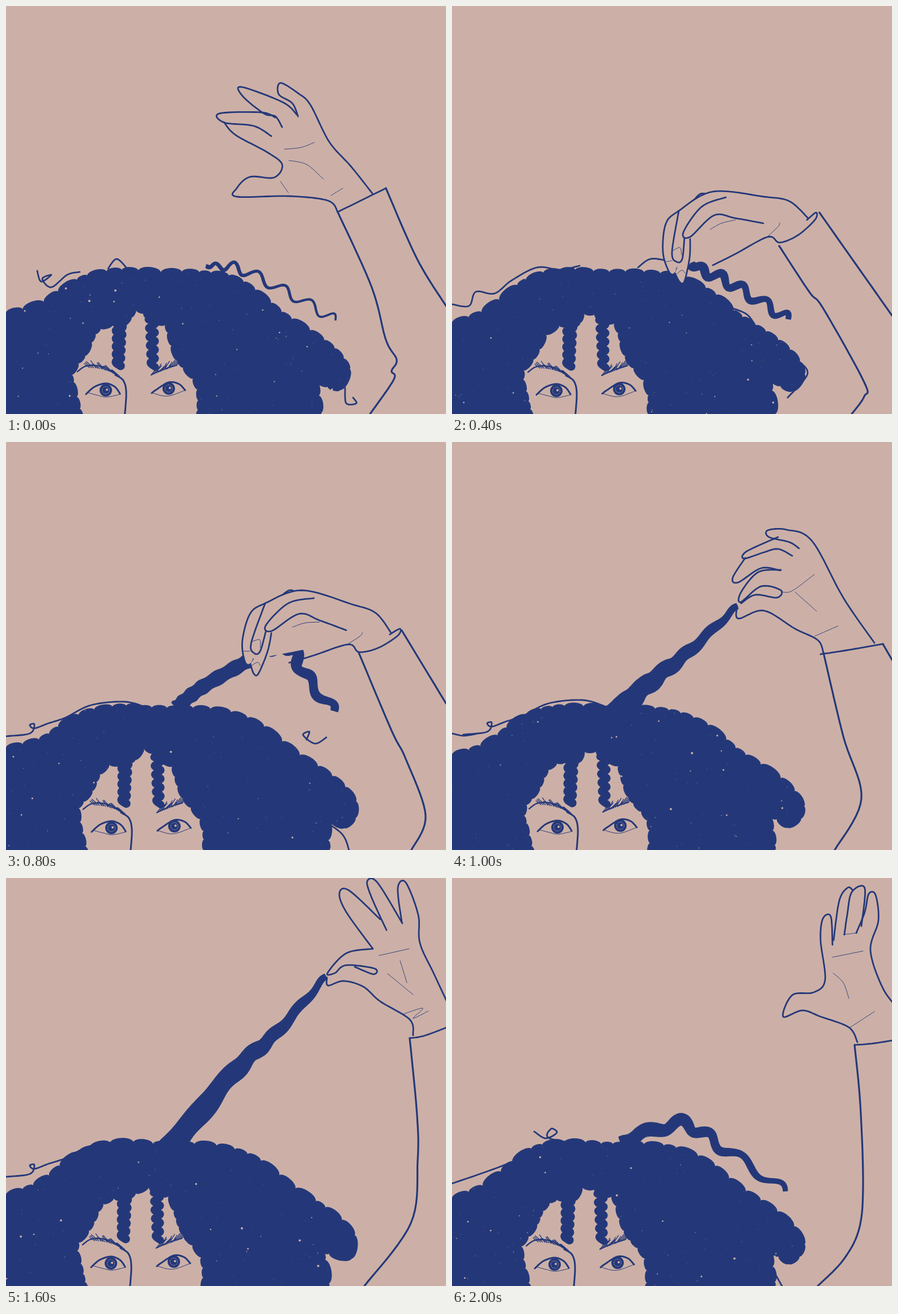
An HTML page that plays this animation: 776 px wide and 721 px high, repeating every 2.2 s.

```html
<!DOCTYPE html>
<html lang="en">
<head>
<meta charset="utf-8">
<title>Curl</title>
<style>
html, body { margin: 0; width: 100%; height: 100%; overflow: hidden; background: #ccb0a7; }
svg { display: block; width: 100vw; height: 100vh; fill: none; stroke: #243879; stroke-linecap: round; stroke-linejoin: round; }
.pose { visibility: hidden; }
.ink { fill: #243879; stroke: none; }
.skin { fill: #ccb0a7; stroke: none; }
.solid { fill: #ccb0a7; }
</style>
</head>
<body>
<svg id="stage" viewBox="0 0 776 721"></svg>
<script>
const STEP = 200;

const points = text => (text.match(/\S+ \S+/g)).map(pair => pair.split(' ').map(Number));
const toPath = pts => 'M' + pts.map(p => p.map(v => v.toFixed(1)).join(' ')).join('L');

function seeded(seed) {
  let s = seed * 7919 + 17;
  const next = () => (s = s * 16807 % 2147483647) / 2147483647;
  next();
  return next;
}

// Catmull-Rom samples through the points
function smooth(pts, steps = 10) {
  const out = [];
  for (let i = 0; i < pts.length - 1; i++) {
    const b = pts[i], c = pts[i + 1], a = pts[i - 1] || b, d = pts[i + 2] || c;
    for (let s = 0; s < steps; s++) {
      const t = s / steps;
      out.push([0, 1].map(k => b[k] + t / 2 * (c[k] - a[k] + t * (2 * a[k] - 5 * b[k] + 4 * c[k] - d[k]
        + t * (3 * b[k] - a[k] - 3 * c[k] + d[k])))));
    }
  }
  return [...out, pts[pts.length - 1]];
}

const line = (text, w, cls = '') => `<path class="${cls}" d="${toPath(smooth(points(text)))}" stroke-width="${w}"/>`;
const lines = (list = [], w, cls) => list.map(s => line(s, w, cls)).join('');

// Scalloped edge: rounded bumps of varying length along a smooth curve
function bumps(pts, size, height, rnd) {
  const curve = smooth(pts, 30);
  let [x, y] = curve[0], goal = size, d = `M${x} ${y}`;
  curve.forEach(([u, v], i) => {
    const dx = u - x, dy = v - y, len = Math.hypot(dx, dy);
    if (len < goal && i < curve.length - 1) return;
    const nx = dy * height, ny = -dx * height;
    d += `C${x + dx * .1 + nx} ${y + dy * .1 + ny} ${u - dx * .1 + nx} ${v - dy * .1 + ny} ${u} ${v}`;
    [x, y] = [u, v];
    goal = size * (.6 + .8 * rnd());
  });
  return d;
}

// Tapered ribbon that waves around a guide curve
function lock({ guide, from, to, amp = 0, waves = 0 }) {
  const withNormals = pts => pts.map(([x, y], i) => {
    const a = pts[Math.max(i - 1, 0)], b = pts[Math.min(i + 1, pts.length - 1)];
    const angle = Math.atan2(b[1] - a[1], b[0] - a[0]);
    return [x, y, -Math.sin(angle), Math.cos(angle), i / (pts.length - 1)];
  });
  const wavy = withNormals(smooth(points(guide), 40)).map(([x, y, nx, ny, t]) => {
    const o = amp * Math.min(1, t * 4) * Math.sin(t * waves * 2 * Math.PI);
    return [x + nx * o, y + ny * o];
  });
  const edge = side => withNormals(wavy).map(([x, y, nx, ny, t]) => {
    const w = side * (from + (to - from) * t) / 2 * (1 + .08 * Math.sin(t * 40));
    return [x + nx * w, y + ny * w];
  });
  return `<path d="${toPath([...edge(1), ...edge(-1).reverse()])}Z" fill="#243879" stroke-width="1.5"/>`;
}

function ringlet(x, top, drift, bottom, width) {
  const n = 11, pts = Array.from({ length: n + 1 }, (_, i) =>
    [x + drift * i / n + (i % 2 ? 6 : -6) * (1 - i / n * .3), top + (bottom - top) * i / n]);
  return `<path d="${toPath(smooth(pts))}" stroke-width="${width}"/>`;
}

function specks(rnd) {
  return Array.from({ length: 130 }, () =>
    `<circle class="skin" cx="${rnd() * 600}" cy="${470 + rnd() * 251}" r="${.4 + 1.6 * rnd() ** 6}"/>`).join('');
}

function eye(x, y, open, upper, lower) {
  return `<g transform="translate(${x} ${y}) scale(1 ${open})"><circle class="ink" r="11"/>
    <circle r="6.5" stroke="#ccb0a7" stroke-width=".7" stroke-dasharray="2 2"/>
    <circle class="skin" cx="2" cy="-1" r="2"/>${line(upper, 3)}${line(lower, 1)}</g>`;
}

function brows() {
  let hairs = '';
  for (let i = 0; i < 15; i++) {
    hairs += `M${156 + i * 3.8} ${641 + 15 * (i / 14) ** 2}l${-9 - i % 3 * 2} ${-7 - i % 4 * 2}`;
    hairs += `M${265 + i * 3.2} ${654 - i * 1.2}l${8 + i % 3 * 2} ${-10 - i % 4 * 2}`;
  }
  return `<path d="${hairs}" stroke-width="1.3"/>` + line('135 648 151 638 177 639 203 653', 2.4) + line('265 654 286 644 310 637', 2);
}

const faceEdge = points('144 735 130 675 126 648 150 618 168 580 190 566 222 568 236 540 252 546 268 562 288 562 300 600 312 630 345 672 347 735');
const hairEdge = points('0 548 60 530 105 497 150 474 210 466 265 470 330 470 395 477 455 503 505 545 560 580 600 612 622 650 598 682 575 668 543 645 562 672 570 721');

const face = (p, rnd) => `<g transform="translate(${p.face})">
  <path class="skin" d="${bumps(faceEdge, 20, -.22, rnd)}Z"/>
  ${eye(185, 681, p.open || 1, '-35 7 -20 -6 0 -12 16 -6 25 6', '-33 4 -14 9 2 12 26 7')}
  ${eye(296, 678, p.open || 1, '-30 8 -22 2 0 -11 18 -8 29 3', '-28 8 -10 13 5 12 29 3')}
  ${brows()}${line('202 654 216 664 221 686 218 730', 3)}
  ${ringlet(209, 562, -2, 638, 15)}${ringlet(266, 556, 2, 640, 13)}</g>`;

function hair(p, rnd) {
  const edge = hairEdge.map(([x, y]) => [x + (x > 450 ? p.lean || 0 : 0), y + p.drop * Math.max(0, 1 - x / 150)]);
  return `<path class="ink" d="${bumps(edge, 30, .25, rnd)}L0 721Z"/>`;
}

const waveHand = {
  outline: ['646 331 608 283 570 240 537 175 515 154 484 136 481 156 505 172 515 195',
    '513 192 488 170 415 143 418 160 455 190 475 195 487 214',
    '475 197 450 188 376 190 385 206 437 212 468 230',
    '384 205 405 228 460 258 487 280 473 303 430 302 407 322 407 337 500 336 568 344 585 364',
    '670 322 585 364'],
  creases: ['491 253 520 250 544 241', '499 273 530 280 560 306', '573 335 594 322', '484 310 498 330']
};

const gripHand = {
  cls: 'solid',
  outline: ['425 345 438 332 452 333', '460 458 500 438 557 408 578 418 610 405 640 378 642 365 626 378',
    '448 392 455 400 450 425 422 443',
    '628 375 595 345 550 337 460 328 400 362 377 385 372 435 383 470 393 473 397 463',
    '420 412 419 445 410 486 402 488 393 472', '400 362 388 435 396 452 406 447 410 408',
    '483 338 440 355 408 400 420 408 462 370 500 375 549 384'],
  creases: ['455 395 475 384 500 378', '557 407 575 390 578 383', '390 432 402 427 405 440', '377 452 388 450', '395 475 405 467 411 472']
};

const liftHand = {
  outline: ['800 270 745 190 690 90 645 70 612 71 614 83 650 92 667 103',
    '630 83 575 108 570 121 605 110 630 104 655 116', '572 120 550 155 560 163 600 138 634 142',
    '635 141 595 145 565 180 564 198 600 170 635 177 628 190 590 185 565 200',
    '558 205 560 227 605 213 660 245 700 265 710 287', '705 290 745 284 815 272'],
  creases: ['637 180 655 178 694 149', '660 180 698 214', '695 258 736 240']
};

const stretchHand = {
  outline: ['790 245 755 170 730 115 727 65 705 8 691 18 698 78', '699 80 655 8 637 6 645 35 671 92',
    '660 73 605 22 588 27 600 60 647 125',
    '647 125 600 133 567 168 580 168 600 154 650 160 648 170 615 157',
    '566 176 568 190 595 182 630 192 660 218 712 250 718 278', '712 283 740 278 800 255'],
  creases: ['658 137 711 125', '673 169 718 206', '695 146 707 185', '702 240 735 230 718 248 745 235']
};

const openHand = {
  outline: ['790 235 760 195 738 128 752 75 747 30 735 28 728 60 713 97', '692 100 697 65 705 25 728 18 722 85',
    '673 110 683 40 698 17 707 22',
    '671 118 668 68 654 72 650 110 658 180 638 202 600 207 584 245 618 234 650 245 700 264 715 290',
    '710 295 745 292 800 283'],
  creases: ['671 140 725 129', '672 168 690 185 700 213', '702 264 745 236', '690 100 715 97']
};

const stage = document.getElementById('stage');
const groups = [];

function addPose(p) {
  const rnd = seeded(groups.length + 1);
  const g = document.createElementNS(stage.namespaceURI, 'g');
  g.setAttribute('class', 'pose');
  g.innerHTML = hair(p, rnd) + specks(rnd) + face(p, rnd)
    + `<g transform="translate(${p.curlShift || '0 0'})">${lines(p.curls, 2.8)}</g>`
    + p.locks.map(lock).join('') + lines(p.sleeve, 3.2)
    + `<g transform="${p.move || 'translate(0 0)'}">${lines(p.hand.outline, 2.8, p.hand.cls)}${lines(p.hand.creases, .9)}</g>`;
  stage.append(g);
  groups.push(g);
}

const wavyEnd = '0 527 30 530 42 505 75 508 105 485 150 462 190 466 225 459';
const loopedEnd = '0 520 42 515 50 499 42 500 50 506 75 497 105 487 150 465 210 459 250 470';

const reach = {
  hand: waveHand, face: '-9 -2', drop: -6, lean: -14,
  curls: ['55 468 62 487 80 475 64 482 80 497 108 475 130 470', '180 464 195 447 213 463', '532 608 555 605 573 632', '598 675 600 702 618 702 612 692'],
  locks: [{ guide: '353 460 410 464 500 508 581 555', from: 6, to: 2, amp: 9, waves: 6 }],
  sleeve: ['585 364 645 497 670 590 689 625 680 645 684 660 642 721', '670 322 725 447 776 530']
};
addPose(reach);
addPose({
  ...reach, face: '-5 -1', move: 'translate(0 15) rotate(-25 600 345)',
  sleeve: ['594 383 662 555 707 645 675 721', '653 309 776 535']
});

const pinch = {
  hand: gripHand, face: '-1 -1', drop: 12,
  curls: [wavyEnd, '328 462 350 447 380 450', '480 530 520 545 540 575', '608 625 627 650 592 692'],
  locks: [{ guide: '420 456 500 495 593 553', from: 15, to: 8, amp: 9, waves: 5 }],
  sleeve: ['577 424 630 505 655 535 727 665 727 690 705 721', '648 365 776 547']
};
addPose(pinch);
addPose({
  hand: gripHand, face: '0 0', drop: -3, open: .82, move: 'translate(14 -9)',
  curls: [wavyEnd, '528 560 555 560 580 600'],
  locks: [{ guide: '285 474 330 444 390 434', from: 24, to: 28 }, { guide: '385 434 450 424 500 476 587 549', from: 26, to: 8, amp: 8, waves: 5 }],
  sleeve: ['591 409 620 475 655 520 741 665 692 721', '655 358 776 525']
});
addPose({
  hand: gripHand, face: '1 1', drop: -8, move: 'translate(62 -66) rotate(10 460 328)',
  curls: [loopedEnd, '565 522 545 533 524 518 535 512 530 526', '535 655 590 690 605 721'],
  locks: [{ guide: '300 470 345 434 428 386', from: 24, to: 24 }, { guide: '465 366 500 362 530 415 579 475', from: 24, to: 12, amp: 7, waves: 4 }],
  sleeve: ['622 372 680 510 705 560 740 660 715 721', '698 333 776 462']
});

const strand = guide => [{ guide, from: 44, to: 9, amp: 2, waves: 6 }];
const lift = {
  hand: liftHand, face: '2 0', drop: 5, curlShift: '20 -3',
  curls: [loopedEnd, '-20 518 0 522 22 519'],
  locks: strand('275 492 375 372 460 305 558 205'),
  sleeve: ['710 287 703 295 716 400 715 550 685 660 628 721']
};
addPose({
  ...lift, face: '1 0', move: 'translate(-55 85)',
  locks: strand('275 492 345 428 420 368 503 290'),
  sleeve: ['655 372 690 520 722 630 675 721', '760 357 776 385']
});
addPose({ ...lift, curls: [...lift.curls, '325 413 348 420 358 398 395 361'] });

const stretch = {
  hand: stretchHand, face: '0 0', drop: 12, curlShift: '0 8',
  curls: [loopedEnd, '335 410 365 404 378 377 400 354'],
  locks: strand('280 490 400 345 480 270 564 174'),
  sleeve: ['712 283 725 420 726 500 714 610 632 721']
};
addPose({
  ...stretch, move: 'translate(-3 17)',
  locks: strand('278 492 400 352 480 282 561 191'),
  sleeve: ['709 300 725 430 714 620 630 721']
});
addPose(stretch);

const release = {
  hand: openHand, face: '-4 2', drop: 18,
  curls: ['0 540 80 512 150 484 200 477 255 482', '145 448 165 460 185 450 175 443 172 460 240 472', '555 675 570 700 582 721'],
  locks: [{ guide: '298 470 400 434 480 478 588 553', from: 26, to: 7, amp: 8, waves: 5 }],
  sleeve: ['710 295 720 400 725 540 718 620 690 675 645 721']
};
addPose({
  ...release, face: '-2 1', move: 'translate(-4 6)',
  locks: [{ guide: '285 480 400 395 490 400 565 470', from: 32, to: 7, amp: 8, waves: 5 }]
});
addPose(release);

const start = performance.now();
function show() {
  const current = Math.floor((performance.now() - start) / STEP) % groups.length;
  groups.forEach((g, i) => { g.style.visibility = i === current ? 'visible' : 'hidden'; });
  requestAnimationFrame(show);
}
show();
</script>
</body>
</html>
```
